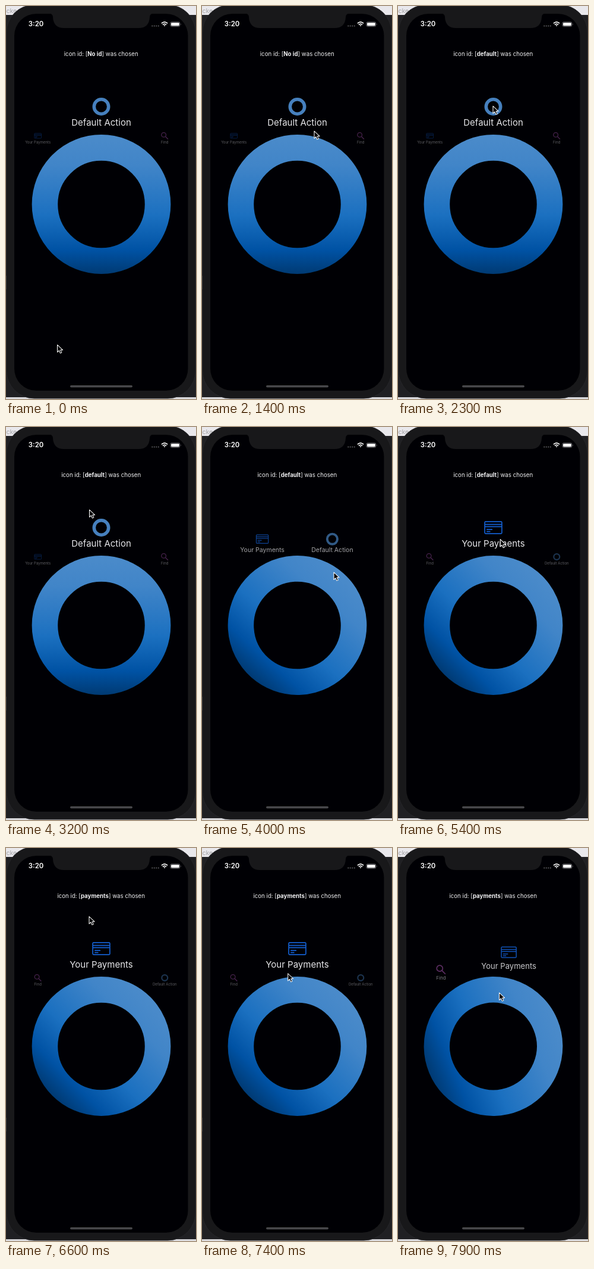
Animation, 320 px wide and 660 px high, one loop 8 s. Source, as an HTML page:

```html
<!DOCTYPE html>
<html lang="en">
<head>
<meta charset="utf-8">
<title>Wheel menu</title>
<style>
  html, body { margin: 0; width: 100%; height: 100%; overflow: hidden; background: #1b1b1d; }
  svg { display: block; width: 320px; height: 660px; }
  text { font-family: Inter, "Open Sans", sans-serif; }
  .label { font-size: 15px; text-anchor: middle; fill: #e6e6e9; }
</style>
</head>
<body>
<svg viewBox="0 0 320 660" xmlns="http://www.w3.org/2000/svg">
  <defs>
    <linearGradient id="blue" gradientUnits="userSpaceOnUse" x1="0" y1="-117" x2="0" y2="117">
      <stop offset="0" stop-color="#4b8bca"/>
      <stop offset=".22" stop-color="#4185c8"/>
      <stop offset=".58" stop-color="#1b70c0"/>
      <stop offset=".83" stop-color="#0052a4"/>
      <stop offset="1" stop-color="#003a73"/>
    </linearGradient>
  </defs>

  <!-- desktop behind the phone -->
  <rect width="320" height="660" fill="#202023"/>
  <rect width="320" height="15" fill="#e9e8ec"/>
  <text x="-2" y="12" font-size="10.5" fill="#a5a5a8">icke</text>
  <rect y="657" width="320" height="3" fill="#d8d8dc"/>
  <rect y="453" width="1" height="23" fill="#e4e4e6"/>

  <!-- phone -->
  <rect x=".5" y="-2" width="319" height="661" rx="47" fill="#18181a" stroke="#2a2a2d" stroke-width=".8"/>
  <rect x="14" y="13" width="292.5" height="633" rx="37" fill="#000004"/>
  <path d="M73 12.5Q79 13 79 19Q80 37 98 37H223Q241 37 242 19Q242 13 248 12.5Z" fill="#18181a"/>
  <rect x="108" y="637" width="105" height="3.6" rx="1.8" fill="#48484b"/>

  <!-- status bar -->
  <text x="50.5" y="34.3" font-size="11.4" font-weight="600" text-anchor="middle" fill="#fff">3:20</text>
  <path d="M246.3 33.5H257" stroke="#5b5b5e" stroke-width="2.2" stroke-linecap="round" stroke-dasharray="0 3.5"/>
  <g fill="none" stroke="#fff" stroke-width="1.6">
    <path d="M261.9 29.2Q267 24.6 272.1 29.2M263.9 31.4Q267 28.7 270.1 31.4"/>
    <path d="M265.5 32.6Q267 31.4 268.5 32.6L267 34.2Z" fill="#fff" stroke="none"/>
  </g>
  <rect x="277" y="26.8" width="15.8" height="7.6" rx="2.2" fill="none" stroke="#88888b" stroke-width=".8"/>
  <rect x="278.1" y="27.9" width="13.6" height="5.4" rx="1.3" fill="#fff"/>
  <path d="M294 29.2Q295.4 30.6 294 32Z" fill="#88888b"/>

  <text x="160.2" y="84.3" font-size="9.7" text-anchor="middle" fill="#f0f0f2">icon id: [<tspan id="chosen" font-weight="700"></tspan>] was chosen</text>

  <g id="payments">
    <g fill="none" stroke="#145fd0" stroke-width="1.7">
      <rect x="-14.4" y="-10.2" width="28.8" height="20.4" rx="1.6"/>
      <path d="M-14.4-5.4H14.4M-14.4-1.6H14.4M-11.3 3.2H-1.5M-11.3 6.6H-5"/>
    </g>
    <text class="label" y="31.6">Your Payments</text>
  </g>
  <g id="default">
    <circle r="12.2" fill="none" stroke="#4680be" stroke-width="5.6"/>
    <text class="label" y="31.6">Default Action</text>
  </g>
  <g id="find">
    <g fill="none" stroke="#b058ba" stroke-width="3.2">
      <circle cx="-4" cy="-4" r="9.4"/>
      <path d="M3 3L14 14"/>
    </g>
    <text class="label" y="31.6">Find</text>
  </g>

  <circle id="ring" r="95.1" fill="none" stroke="url(#blue)" stroke-width="43.6"/>
  <path id="cursor" d="M0 0V13.2L3.1 10.4L5.3 15.2L7.8 14.1L5.7 9.4H9.7Z" fill="#08080a" stroke="#fff" stroke-width="1.1" stroke-linejoin="round"/>
</svg>
<script>
const LOOP = 8000, STEP = 100;
const CENTER = { x: 160.5, y: 333 };
const DRAGS = [3750, 7750];
const RING_TIME = 300, ITEM_TIME = 500;
const el = id => document.getElementById(id);

const smooth = k => k * k * (3 - 2 * k);
const clamp = k => Math.max(0, Math.min(1, k));
const mix = (a, b, k) => a + (b - a) * k;

// Each drag turns the wheel by one step; the items trail behind the ring.
const turned = (time, duration) =>
  DRAGS.reduce((sum, start) => sum + smooth(clamp((time - start) / duration)), 0);

// Pointer stops: time, x, y
const stops = [
  [0, 86.5, 569], [1400, 189, 210], [2300, 160, 168], [3200, 140.5, 139],
  [3750, 164, 235], [4000, 222, 244], [4500, 202, 239], [5900, 160, 168],
  [6600, 140, 115], [7750, 146, 238], [7900, 170.5, 243]
];

function pointerAt(time) {
  const next = stops.findIndex(stop => stop[0] > time);
  if (next < 0) return stops[stops.length - 1].slice(1);
  const [t0, x0, y0] = stops[next - 1], [t1, x1, y1] = stops[next];
  const k = smooth((time - t0) / (t1 - t0));
  return [mix(x0, x1, k), mix(y0, y1, k)];
}

function placeItem(id, slot, turn) {
  const pos = ((turn + slot + 4.5) % 3) - 1.5;
  const depth = Math.abs(pos);
  const x = CENTER.x + 139.4 * Math.sin(pos * 50 * Math.PI / 180);
  const y = 169 + 49 * depth ** 1.35;
  const scale = 1 - 0.595 * depth;
  const opacity = clamp(1 - 0.6 * depth - 4 * Math.max(0, depth - 1));
  el(id).setAttribute("transform", `translate(${x} ${y}) scale(${scale})`);
  el(id).setAttribute("opacity", opacity);
}

function draw(time) {
  const turn = turned(time, ITEM_TIME);
  ["payments", "default", "find"].forEach((id, i) => placeItem(id, i - 1, turn));

  const angle = 45 * turned(time, RING_TIME);
  el("ring").setAttribute("transform", `translate(${CENTER.x} ${CENTER.y}) rotate(${angle})`);

  const [x, y] = pointerAt(time);
  el("cursor").setAttribute("transform", `translate(${x} ${y}) scale(.93)`);

  const label = time < 2300 ? "No id" : time < 5900 ? "default" : "payments";
  if (el("chosen").textContent !== label) el("chosen").textContent = label;
}

const start = performance.now();
function tick() {
  const time = (performance.now() - start) % LOOP;
  draw(Math.floor(time / STEP) * STEP);
  requestAnimationFrame(tick);
}
tick();
</script>
</body>
</html>
```
